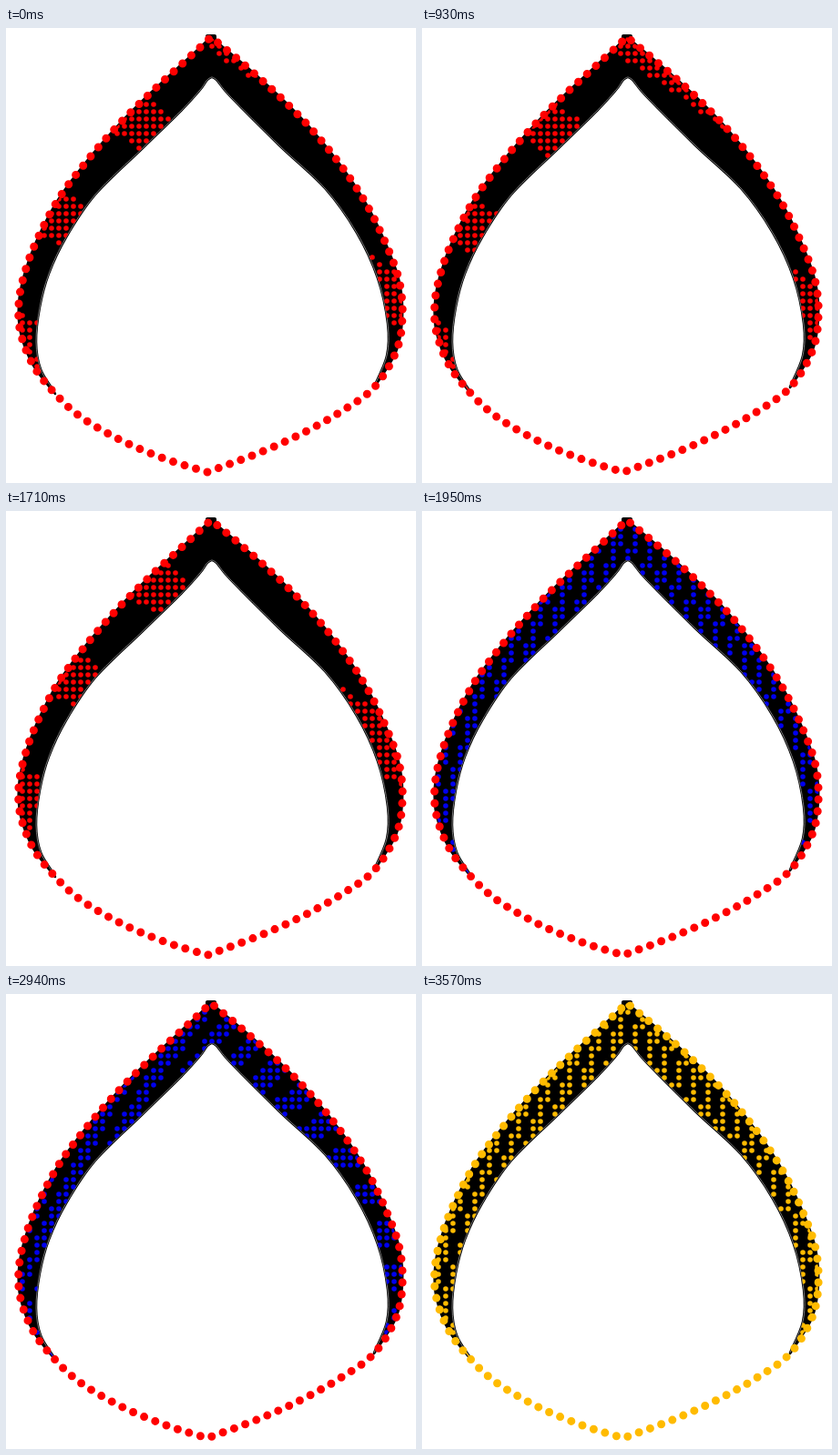
Write an HTML page that moves like this. It is 450 px wide and 500 px high and loops after 3.6 s.

```html
<!DOCTYPE html>
<html lang="en">
<head>
<meta charset="utf-8">
<title>Dome lights</title>
<style>
  html, body { margin: 0; width: 100%; height: 100%; overflow: hidden; background: #fff; }
  svg { display: block; width: 450px; height: 500px; }
</style>
</head>
<body>
<svg viewBox="0 0 450 500">
  <defs><clipPath id="clip"><path id="clipShape"/></clipPath></defs>
  <path id="band" stroke="#000" stroke-width="2.5" stroke-linejoin="round"/>
  <path id="rim" fill="none" stroke="#777" stroke-width="1"/>
  <rect x="219" y="7" width="12" height="9" rx="2"/>
  <path id="leds" clip-path="url(#clip)"/>
  <path id="bulbs"/>
  <path id="track" fill="none"/>
</svg>
<script>
const $ = id => document.getElementById(id);
const pairs = s => s.split(' ').map(p => p.split(',').map(Number));
const mod = (a, n) => ((a % n) + n) % n;

// Edges run from the top downwards; the last points continue below the band.
const left = pairs('225,10 197,36 159,71 122,108 88,147 57,189 33,235 20,271 14,303 16,335 30,371 54,402 83,428 128,454 176,474 221,488');
const right = pairs('225,10 261,40 300,75 336,112 369,153 397,196 419,242 432,280 435,319 428,356 404,395 367,422 322,447 275,468 221,488');
const inner = pairs('52,398 38,375 33,345 37,307 47,270 66,230 98,183 150,132 192,91 213,68 222,56 230,56 246,75 300,129 350,176 385,225 408,275 419,325 418,360 404,394');

// Smooth curve through the points, without the initial move.
function curve(pts) {
  let d = '';
  for (let i = 0; i < pts.length - 1; i++) {
    const a = pts[i - 1] || pts[i], b = pts[i], c = pts[i + 1], e = pts[i + 2] || c;
    const ctrl = [b[0] + (c[0] - a[0]) / 6, b[1] + (c[1] - a[1]) / 6,
                  c[0] - (e[0] - b[0]) / 6, c[1] - (e[1] - b[1]) / 6, c[0], c[1]];
    d += 'C' + ctrl.map(v => v.toFixed(2)).join(' ');
  }
  return d;
}

const upRight = right.slice().reverse();
const shape = 'M52 398' + curve(inner) + 'L404 395' +
  curve(right.slice(0, 11).reverse()) + curve(left.slice(0, 12)) + 'Z';
$('band').setAttribute('d', shape);
$('clipShape').setAttribute('d', shape);
$('rim').setAttribute('d', 'M52 398' + curve(inner));
$('track').setAttribute('d', 'M221 488' + curve(upRight) + curve(left));

const track = $('track'), total = track.getTotalLength();
const COUNT = 103, gap = total / COUNT, PITCH = 8;

const disc = (x, y, r) =>
  `M${(x - r).toFixed(1)} ${y.toFixed(1)}a${r} ${r} 0 1 0 ${2 * r} 0a${r} ${r} 0 1 0 ${-2 * r} 0`;

const grid = [];
const probe = $('svg') || document.querySelector('svg');
for (let y = 12; y < 400; y += PITCH) {
  for (let x = 18; x < 436; x += PITCH) {
    const p = probe.createSVGPoint();
    p.x = x; p.y = y;
    if ($('band').isPointInFill(p)) grid.push([x, y]);
  }
}

const FRAME = 30, LOOP = 3600, BLUE = 60, YELLOW = 110;

// Wide bars sliding down and to the left.
const bars = (x, y, f) => mod(y - 0.7 * x + 32 - f * 166 / 15, 166) < 65;

// Narrow slanted stripes that bend by the amount q.
const stripes = (x, y, f, q) =>
  mod((0.05 - 0.003 * q) * x - 0.00005 * q * x * x + (0.015 + 0.005 * q) * y - f * 0.06, 1) < 0.58;

function render(ms) {
  const f = Math.floor(mod(ms, LOOP) / FRAME);
  const red = f < BLUE, yellow = f >= YELLOW;
  const q = yellow ? 0 : Math.max(0, (f - BLUE - 5) / 33);

  let d = '';
  for (const [x, y] of grid) {
    if (red ? bars(x, y, f) : stripes(x, y, f, q)) d += disc(x, y, 2.8);
  }
  $('leds').setAttribute('d', d);
  $('leds').setAttribute('fill', red ? '#f00' : yellow ? '#fb0' : '#00e');

  const shift = Math.min(f, BLUE) * 0.1065 * gap;
  d = '';
  for (let i = 0; i < COUNT; i++) {
    const p = track.getPointAtLength(mod(i * gap + shift, total));
    d += disc(p.x, p.y, 4.5);
  }
  $('bulbs').setAttribute('d', d);
  $('bulbs').setAttribute('fill', yellow ? '#fb0' : '#f00');
}

const start = performance.now();
function tick(now) {
  render(Math.max(0, now - start));
  requestAnimationFrame(tick);
}
render(0);
requestAnimationFrame(tick);
</script>
</body>
</html>
```
